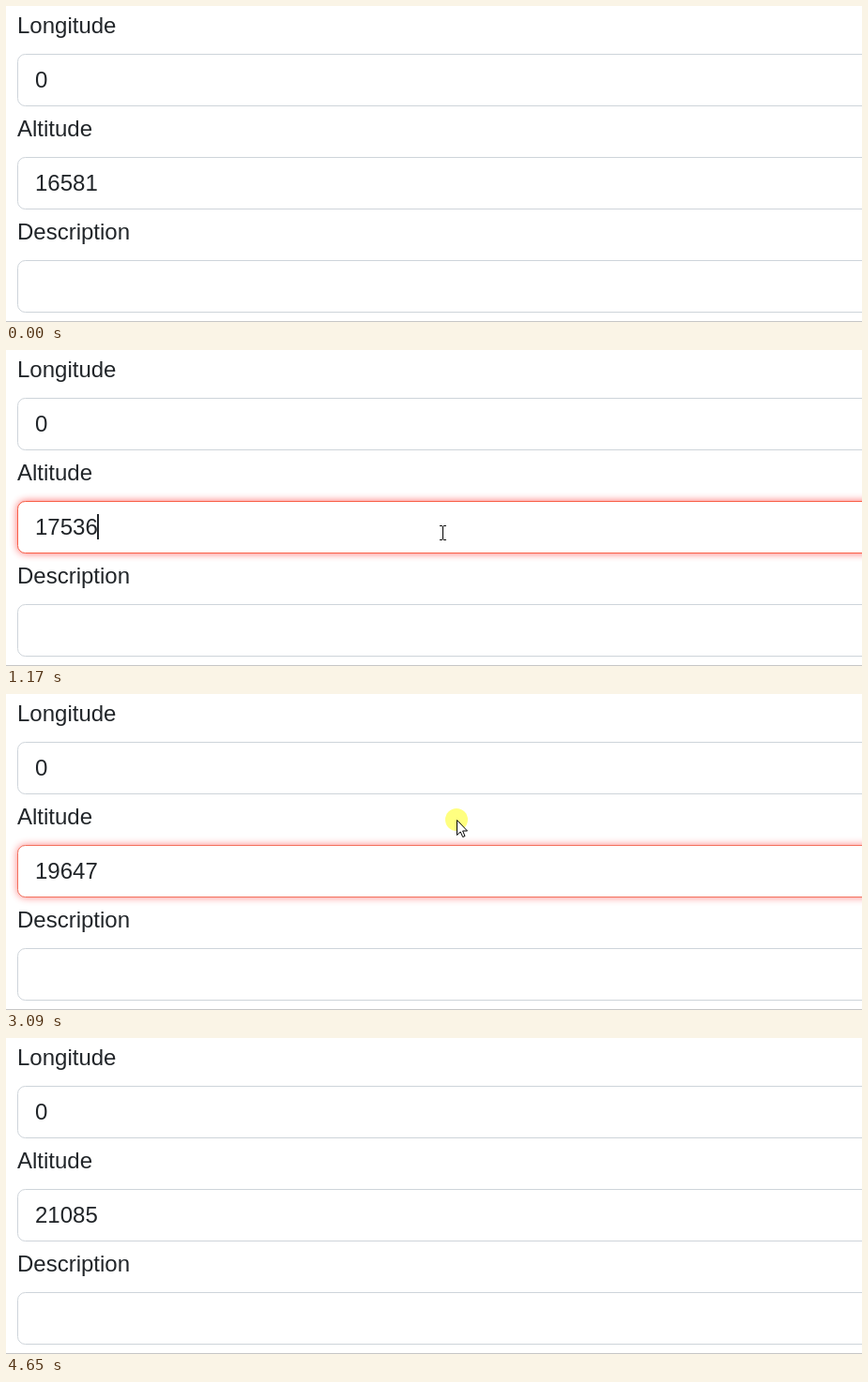
Recreate the animation shown at these times as an HTML page. Size 912x337 px, loop 4.73 s.

```html
<!DOCTYPE html>
<html lang="en">
<head>
<meta charset="utf-8">
<title>Altitude form</title>
<style>
  html, body { margin: 0; width: 100%; height: 100%; overflow: hidden; background: #fff; }
  svg { display: block; width: 100%; height: 100%; overflow: hidden; }
  text { font: 24px "Liberation Sans", Arial, sans-serif; fill: #212529; }
  .field { x: 12.5px; width: 930px; height: 55px; rx: 8px; fill: #fff; stroke: #ced4da; }
  #focus { stroke: #ff5236; filter: drop-shadow(0 0 4px rgba(255, 0, 0, .65)); }
</style>
</head>
<body>
<svg>
  <path d="M0 336.5H912" stroke="#c6c6c6"/>
  <rect class="field" y="51.5"/>
  <rect class="field" y="161.5"/>
  <rect class="field" y="271.5"/>
  <rect class="field" y="161.5" id="focus"/>
  <text x="12" y="29">Longitude</text>
  <text x="31" y="87">0</text>
  <text x="12" y="139">Altitude</text>
  <text x="31" y="197" id="altitude"></text>
  <text x="12" y="249">Description</text>
  <rect id="caret" x="97" y="175" width="2" height="27" fill="#212529"/>
  <g id="pointer">
    <circle id="press" r="12" fill="#ffff80"/>
    <path id="beam" d="M-3 -7.5H0M1 -7.5H4M.5 -7V7M-3 7.5H0M1 7.5H4" stroke="#000" fill="none"/>
    <path id="arrow" d="M.5 .5V16.5L4.2 13L6.7 18.5L9 17.5L6.6 12H11.5Z" stroke="#000" fill="#fff"/>
  </g>
</svg>
<script>
const LOOP = 4730, TICKS = 70, STEP = LOOP / TICKS;
const el = id => document.getElementById(id);
const show = (id, on) => el(id).style.display = on ? "" : "none";
const within = (v, a, b) => v >= a && v <= b;
const clamp = v => Math.max(0, Math.min(1, v));
const ease = v => (v = clamp(v), v * v * (3 - 2 * v));

// Pointer stops: tick, x, y
const stops = [[7, 576, 296], [8, 450, 224], [9, 456, 215], [12, 465, 195], [36, 465, 195],
  [43, 480, 134], [50, 480, 134], [52, 577, 143], [53, 841, 328]];

function pointerAt(n) {
  const i = Math.max(1, stops.findIndex(s => s[0] >= n));
  const [a, x0, y0] = stops[i - 1], [b, x1, y1] = stops[i];
  const k = clamp((n - a) / (b - a));
  return [Math.round(x0 + (x1 - x0) * k), Math.round(y0 + (y1 - y0) * k)];
}

// The counter holds while the field has focus, then catches up
const altitude = n => n < 46
  ? Math.min(16581 + 63.22 * n, 17536)
  : 19647 + 62 * (n - 46) + 1.33 * Math.max(0, n - 60);

function draw(ms) {
  const n = Math.min(TICKS - 1, Math.floor((ms % LOOP + 20) / STEP));
  const t = n * STEP;
  const [x, y] = pointerAt(n);
  const beam = within(y, 161, 216) || within(y, 271, 326);

  el("altitude").textContent = Math.round(altitude(n));
  el("focus").style.opacity = ease((t - 1030) / 150) - ease((t - 3060) / 150);
  el("pointer").setAttribute("transform", `translate(${x} ${y})`);
  show("pointer", within(n, 7, 53));
  show("beam", beam);
  show("arrow", !beam);
  show("press", within(n, 15, 16) || within(n, 45, 47));
  show("caret", within(n, 15, 44) && (t - 950) % 1060 < 530);
}

const begin = performance.now();
function loop() {
  draw(performance.now() - begin);
  requestAnimationFrame(loop);
}
loop();
</script>
</body>
</html>
```
